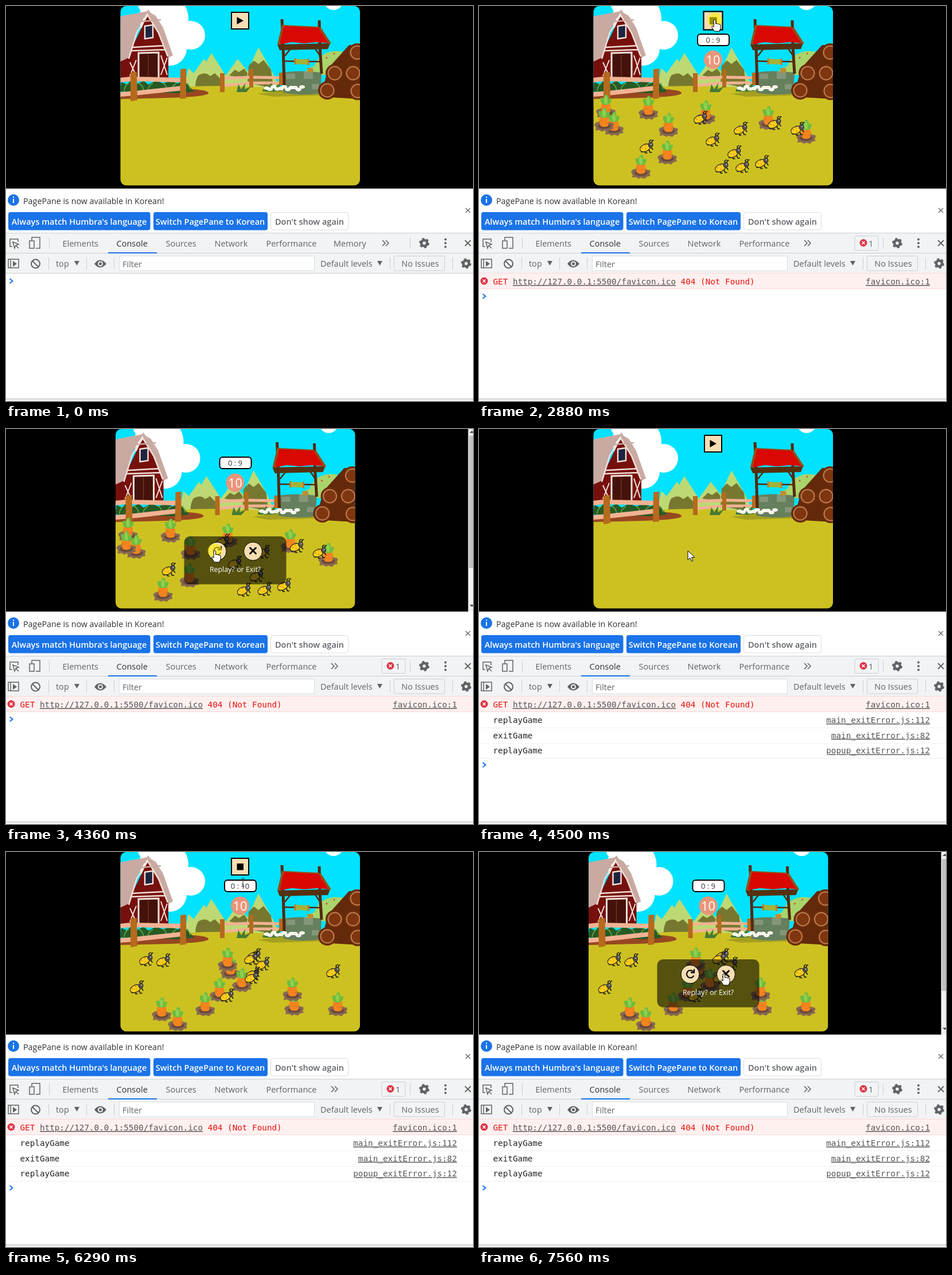
These frames come from a looping animation (814 by 688 pixels, 8 s). An HTML page:

```html
<!DOCTYPE html>
<html lang="en">
<head>
<meta charset="utf-8">
<title>Carrot game</title>
<style>
html, body { margin: 0; width: 100%; height: 100%; overflow: hidden; background: #fff; }
svg { display: block; }
text { font-family: "Open Sans", "Noto Sans", sans-serif; font-size: 14.5px; fill: #5f6368; white-space: pre; }
.mid { text-anchor: middle; }
.bold { font-weight: 600; }
.dark { fill: #303134; }
.white { fill: #fff; }
.mono text { font-family: "DejaVu Sans Mono", "Noto Sans Mono", monospace; font-size: 14.3px; fill: #222; }
.mono .red { fill: #e8120c; }
.mono .link { fill: #555; text-decoration: underline; }
.mono .end { text-anchor: end; }
.icon { fill: none; stroke: #5f6368; }
.sep { stroke: #cbcdd1; }
.ink { fill: none; stroke: #111; stroke-linecap: round; }
.trim { fill: none; stroke: #f2e0d8; }
</style>
</head>
<body>
<svg width="814" height="688" viewBox="0 0 814 688">
<defs>
  <clipPath id="field"><rect x="199.500" width="417.500" height="312.500" rx="10"/></clipPath>
  <g id="carrot">
    <path fill="#87684f" d="M-17 6q2-5 7-5l3-3h14l3 4 6 1q2 3-1 6l2 4-6 1-4 4-7-2-3 2-6-3-6 1 1-5z"/>
    <path fill="#684a3c" d="M-11 6h23q0 7-12 7t-11-7z"/>
    <path fill="#f5841f" d="M-8-7q8-3 16 0 1 8-1 15 -7 3-13 0-3-7-2-15z"/>
    <path d="M-7-1h4M3 3h4" stroke="#dd6a10"/>
    <path fill="#6bbd3e" d="M-4-6q-7-5-5-12 6-1 6 2 0-7 4-8 5 2 3 9 3-3 6-1 0 7-6 10z"/>
    <path fill="#8fd050" d="M-1-7q-5-9 1-15 5 7 2 15z"/>
  </g>
  <g id="bug">
    <path class="ink" stroke-width="1.500" d="M-8 6l-1 3 3 0M-3 7l1 4 3 0M4 5l2 5 3 0M8 1l3 4M6-7l-1-3 3-2M9-7l1-4 2 0"/>
    <ellipse cx="-3" cy="1" rx="9.500" ry="6.200" transform="rotate(-24)" fill="#f6cf1c" stroke="#332c1c" stroke-width="1.300"/>
    <g fill="#e9951a"><circle cx="-7" cy="2" r="1.200"/><circle cx="-2" cy="-2" r="1.200"/><circle cx="-1" cy="4" r="1.200"/></g>
    <ellipse cx="7" cy="-3" rx="4" ry="4.800" fill="#55504e" stroke="#2b2725"/>
    <circle cx="8" cy="-4" r="1" fill="#ddd"/>
  </g>
  <g id="gear">
    <circle r="5" fill="none" stroke="#5f6368" stroke-width="4.500"/>
    <circle r="7.700" fill="none" stroke="#5f6368" stroke-width="2.600" stroke-dasharray="4 4.060"/>
  </g>
  <g id="log">
    <circle r="16" fill="#6b2b0a"/><circle r="11.500" fill="#7f3610" stroke="#bd7f50" stroke-width="2"/>
  </g>
  <path id="cross" d="M-5-5L5 5M5-5L-5 5"/>
  <g id="fault"><circle r="6.500" fill="#dc3545"/><path d="M-2.500-2.500l5 5m0-5l-5 5" stroke="#fff" stroke-width="1.500"/></g>
</defs>

<rect width="814" height="318"/>
<g id="page">
  <g clip-path="url(#field)">
    <rect x="199" width="419" height="160" fill="#00e2ff"/>
    <g fill="#fff">
      <circle cx="275" cy="22" r="43"/><circle cx="322" cy="51" r="25"/><circle cx="285" cy="74" r="30"/>
      <circle cx="246" cy="-3" r="16"/><circle cx="571" cy="-10" r="17"/>
    </g>
    <!-- hills -->
    <path fill="#bdd974" d="M310 143l8-35 9 9 18-25 4 5 9-15 25 39 21-29 17 22 19-42 22 39 15 32z"/>
    <path fill="#777830" d="M330 143q0-14 5-22 8-5 15-3l6 4 8-5 12 12 4 14zM389 121l10-10 7 4 9-6 6 8-2 10zM421 134l2-30 9-9 8 6 9-7 13 17 4 32z"/>
    <path fill="#cdc122" d="M199 152q90-14 190-13l95 4 133-5V313H199z"/>
    <!-- barn -->
    <path fill="#76100d" d="M199 94l14-8 34-70 20 31 16 40v40h-84z"/>
    <path fill="#c9aaa2" d="M199 18l48-9-19 34-14 47-15 7z"/>
    <path fill="#c9aaa2" d="M247 9l14 8 13 21 17 48-8 4-17-44-19-30z"/>
    <path class="trim" stroke-width="2.500" d="M214 92l14-46 19-30 19 31 16 41M221 72l54-3M218 78l60-2"/>
    <path class="trim" stroke-width="2" d="M216 98l11 24M227 94l-11 28M270 86l11 34M281 90l-11 30"/>
    <path fill="#45120b" stroke="#f2e0d8" stroke-width="3" d="M231 82l35-1v47h-35z"/>
    <path d="M248 84v40" stroke="#7d4027"/>
    <path fill="#1c2440" stroke="#f2e0d8" stroke-width="2.500" d="M242 35l14-2v22l-14 2z"/>
    <path fill="none" stroke="#c9aaa2" stroke-width="2.500" d="M236 27l34-3M240 20l8-12 7 11"/>
    <!-- near fence -->
    <path fill="#974721" d="M199 151q60-9 128-6 27 2 26 7-3 6-70 8l-84 2z"/>
    <path fill="#275a24" d="M199 149l2-17 10 5 6-7 11 6 12-6 8 7 14-7 12 5 12-5 14 5 8-7 20 21-22 3z"/>
    <path fill="none" stroke="#68a84b" stroke-width="1.500" d="M206 148q1-10 8-14M240 148q-1-10-9-14M247 148q1-9 9-13M281 147q-1-10-8-13M288 147q2-9 9-12M321 145q-2-9-6-11"/>
    <path fill="none" stroke="#f2b293" stroke-width="8" d="M199 129l18-2 90 2 8-2M199 154l25-2 83-9"/>
    <path fill="#b56a1d" d="M217 116l11-1 1 49-12 2zM304 110l10-1v52l-11 1z"/>
    <!-- far fence -->
    <path fill="none" stroke="#f2b293" stroke-width="5" d="M376 126l52-2 52 1M376 139l50-5 56 0"/>
    <path fill="#b56a1d" d="M373 117h8v33h-8zM424 110h7v32h-7zM476 116h8v22h-8z"/>
    <path fill="#477a35" d="M402 150l3-14 5 9 7-11-1 11 11-5-8 10zM447 149l4-12 6 8 5-11 6 8 8-7 6 15z"/>
    <!-- bush, well -->
    <path fill="#a9d46b" d="M520 119q4-11 17-14 9-23 32-26 21-3 36 13v30z"/>
    <g fill="#d9482c"><circle cx="549" cy="100" r="1.500"/><circle cx="559" cy="90" r="1.500"/><circle cx="572" cy="83" r="1.500"/><circle cx="586" cy="88" r="1.500"/><circle cx="534" cy="112" r="1.500"/></g>
    <path fill="#a6a020" d="M438 153l48-6 66 1 13 7-100 3z"/>
    <path fill="#667f5d" d="M483 116q30-5 67 0l-2 36q-34 5-65-1z"/>
    <path fill="#84967a" d="M489 118h15v9h-15zM519 114h16v13h-16zM533 136h12v9h-12z"/>
    <path fill="none" stroke="#55290e" stroke-width="5" d="M481 23l2 47 2 68M546 25l1 45 3 48"/>
    <path fill="none" stroke="#55290e" stroke-width="2.500" d="M484 96l65 1M486 87l12-15M547 86l-9-13"/>
    <path fill="#56310f" d="M473 67l92-2-4 10-84 2z"/>
    <path fill="#d90800" d="M483 34l63 3 18 28-22-2-22 2-22-2-22 4z"/>
    <path fill="none" stroke="#925019" stroke-width="4" d="M483 33l-8 34M547 38l18 28"/>
    <path fill="none" stroke="#925019" stroke-width="2" d="M483 34l63 3"/>
    <path fill="#a5b235" d="M504 92l23 1v9l-23-1z"/><path stroke="#c47827" stroke-width="3" d="M504 91v11M527 92v11"/>
    <path fill="#bd8d31" d="M525 108h10l-1 8h-8z"/>
    <g id="daisies" fill="#fff"></g>
    <path fill="#63290b" d="M548 158l14-50 36-40h20v94z"/>
    <use href="#log" x="612" y="81"/><use href="#log" x="605" y="117"/><use href="#log" x="573" y="117"/>
    <use href="#log" x="613" y="148"/><use href="#log" x="560" y="147"/>
    <g id="items"></g>
  </g>
  <g id="button">
    <rect x="393" y="11" width="30" height="29" fill="#f5deb3" stroke="#000" stroke-width="2"/>
    <path id="play" d="M402.500 19v13l11.500-6.500z"/>
    <rect id="stop" x="402.500" y="20" width="11.500" height="11.500"/>
  </g>
  <g id="hud">
    <rect x="381" y="49" width="55" height="20" rx="5" fill="#fff" stroke="#000" stroke-width="2"/>
    <text id="timer" class="mid dark" x="408" y="64" style="font-size:13px"></text>
    <circle cx="408" cy="93.500" r="16" fill="#e9967a"/>
    <text class="mid white" x="408" y="101.500" style="font-size:21.500px">10</text>
  </g>
</g>

<g id="popup">
  <rect x="805.500" width="9" height="318" fill="#f1f1f1"/>
  <rect x="807" y="12" width="7" height="230" fill="#c1c1c1"/>
  <path d="M808 7l4-4 4 4zM808 306l4 4 4-4z" fill="#505050"/>
  <rect x="310.500" y="187" width="178" height="83.500" rx="10" opacity=".58"/>
  <g fill="#f5deb3" stroke="#000"><circle cx="368" cy="213" r="16"/><circle cx="430.500" cy="213" r="16"/></g>
  <path class="ink" stroke-width="2.300" d="M373 208a6.500 6.500 0 1 0 1 8M375 205v5h-5"/>
  <use href="#cross" x="430.500" y="212" class="ink" stroke-width="3"/>
  <text class="mid white" x="399.500" y="249" style="font-size:12.400px">Replay? or Exit?</text>
</g>

<!-- developer panel -->
<rect y="318" width="814" height="370" fill="#fff"/>
<circle cx="13" cy="338" r="10" fill="#1a73e8"/>
<path d="M13 336v7M13 332v2" stroke="#fff" stroke-width="2"/>
<text class="dark" x="30" y="344.500" style="font-size:14.300px">PagePane is now available in Korean!</text>
<rect x="4" y="359" width="247.500" height="31.500" rx="4" fill="#1a73e8"/>
<rect x="257" y="359" width="199" height="31.500" rx="4" fill="#1a73e8"/>
<rect x="461.500" y="359.500" width="135" height="30.500" rx="4" fill="#fff" stroke="#dadce0"/>
<text class="mid bold white" x="127.500" y="381">Always match Humbra's language</text>
<text class="mid bold white" x="356" y="381">Switch PagePane to Korean</text>
<text class="mid bold" x="529" y="381">Don't show again</text>
<use href="#cross" x="805" y="356" class="icon" stroke-width="1.600" transform="translate(161 71.200) scale(.8)"/>
<rect y="395" width="814" height="70" fill="#f1f3f4"/>
<path class="sep" d="M0 395.500h814M0 430.500h814M0 465.500h814M75.500 403v20M704.500 403v20M74.500 438v21M140.500 438v21M188.500 438v21M669.500 438v21M778.500 438v21"/>
<g class="icon" stroke-width="1.500">
  <path d="M11 419H7V406h14v5M12 411l10 4-5 2-2 5z M17 417l5 5"/>
  <path d="M45 408v-5h14v19h-7M41 409h8v13h-8z"/>
  <path d="M4 441h18v15H4zM8 441v15"/>
  <circle cx="51.500" cy="449" r="7.500" stroke-width="2"/><path d="M46 444l11 11" stroke-width="2"/>
</g>
<path d="M12 444v10l7-5z" fill="#5f6368"/>
<text x="98.500" y="419">Elements</text>
<text class="dark" x="192.500" y="419">Console</text>
<text x="278.500" y="419">Sources</text>
<text x="363.500" y="419">Network</text>
<text x="453.500" y="419">Performance</text>
<text id="memory" x="571" y="419">Memory</text>
<path d="M178 430h85" stroke="#1a73e8" stroke-width="2"/>
<path id="more" class="icon" stroke-width="1.500" d="M-5-5l5 5-5 5M1-5l5 5-5 5"/>
<g id="badge">
  <rect x="655" y="400.500" width="41" height="25" rx="2" fill="#f1f3f4" stroke="#cbcdd1"/>
  <use href="#fault" x="670" y="412.500"/><text x="679" y="419">1</text>
</g>
<use href="#gear" x="729" y="413"/><use href="#gear" x="802" y="448.500"/>
<g fill="#5f6368"><circle cx="766" cy="406.500" r="2"/><circle cx="766" cy="413" r="2"/><circle cx="766" cy="419.500" r="2"/></g>
<use href="#cross" x="805" y="413" class="icon" stroke-width="1.800"/>
<text x="87" y="454">top</text>
<path d="M119 444h9l-4.500 8zM647 444h9l-4.500 8z" fill="#5f6368"/>
<path d="M154 449q10-13 21 0-11 13-21 0z" fill="#5f6368"/>
<circle cx="164.500" cy="449" r="3.500" fill="#5f6368" stroke="#f1f3f4" stroke-width="2"/>
<rect x="197.500" y="435.500" width="340" height="25.500" fill="#fff" stroke="#dadce0"/>
<text x="203" y="455">Filter</text>
<text x="548" y="454">Default levels</text>
<rect x="676.500" y="435.500" width="88" height="25.500" rx="2" fill="none" stroke="#cbcdd1"/>
<text class="mid" x="722" y="454">No Issues</text>
<g id="error" class="mono">
  <rect y="466" width="814" height="26.500" fill="#fff0f0"/>
  <path d="M0 465.500h814M0 492.500h814" stroke="#ffd6d6"/>
  <use href="#fault" x="9" y="479"/>
  <text class="red" x="24.500" y="485">GET <tspan class="link">http://127.0.0.1:5500/favicon.ico</tspan> 404 (Not Found)</text>
  <text class="link end" x="786" y="485">favicon.ico:1</text>
</g>
<g id="logs" class="mono"></g>
<path id="prompt" d="M-2.500-4l5 4-5 4" fill="none" stroke="#1a73e8" stroke-width="2"/>
<path d="M0 684.500h814" stroke="#cbcdd1" stroke-width="2"/>
<rect y="686" width="814" height="2" fill="#f8f9fa"/>

<g id="pointer">
  <circle id="press" r="12.500" fill="#ffef00" opacity=".6"/>
  <path id="arrow" d="M0 0v16l4-3.500 2.500 6 2.500-1-2.500-6H12z" fill="#fff" stroke="#000"/>
  <path id="hand" d="M-1.800 1.500a1.700 1.700 0 0 1 3.400 0V7q1.600-1.500 3 .3 1.500-1 2.800.6 2.400-.6 2.600 1.600V14q0 3-1.500 4v2H-.800L-4.800 13.500q-1.200-2.600.6-3l2.400 2z" fill="#fff" stroke="#000"/>
  <path id="beam" d="M-3-7h2.500M.500-7H3M0-7V7M-3 7h2.500M.500 7H3" stroke="#333" fill="none"/>
</g>
</svg>

<script>
const $ = id => document.getElementById(id);
const show = (id, on) => $(id).style.display = on ? '' : 'none';
const move = (id, x, y) => $(id).setAttribute('transform', `translate(${x} ${y})`);
const within = (t, a, b) => t >= a && t < b;

const rounds = [
  { carrots: [[221,178],[235,208],[218,201],[295,180],[330,210],[328,258],[282,283],[395,188],[504,198],[570,222]],
    bugs: [[386,195],[456,214],[515,204],[555,214],[407,233],[292,245],[445,255],[423,280],[459,279],[493,272]] },
  { carrots: [[391,204],[386,190],[411,226],[372,243],[347,268],[271,277],[299,294],[502,267],[499,242],[578,268]],
    bugs: [[244,187],[274,189],[432,180],[427,185],[447,195],[430,212],[428,218],[385,250],[570,208],[228,236]] }
];
const place = (name, spots) => spots.map(([x, y]) => `<use href="#${name}" x="${x}" y="${y}"/>`).join('');
$('items').innerHTML = rounds.map((r, i) => `<g id="round${i}">${place('carrot', r.carrots)}${place('bug', r.bugs)}</g>`).join('');

$('daisies').innerHTML = Array.from({ length: 11 }, (_, i) => {
  const x = 454 + i * 6.2, y = 143 + 2.5 * Math.sin(i * 2.3);
  return `<ellipse cx="${x}" cy="${y}" rx="5" ry="3"/><circle cx="${x}" cy="${y}" r=".8" fill="#e9c92c"/>`;
}).join('');

$('logs').innerHTML = [['replayGame', 'main_exitError.js:112'], ['exitGame', 'main_exitError.js:82'], ['replayGame', 'popup_exitError.js:12']]
  .map(([msg, link], i) => {
    const y = 512 + i * 26.7;
    return `<text x="24.500" y="${y}">${msg}</text><text class="link end" x="786" y="${y}">${link}</text>` +
      `<path d="M0 ${Math.round(y + 8) + .5}h814" stroke="#f0f0f0"/>`;
  }).join('');

// Pointer legs: start, end, steps, destination
const legs = [
  [130, 270, 3, 480, 30], [600, 1210, 10, 411, 24], [3230, 3560, 6, 364, 212],
  [4700, 5290, 9, 420, 31], [5360, 5490, 3, 411, 24], [5960, 6290, 6, 413, 53],
  [6360, 6630, 5, 411, 24], [6840, 7560, 11, 427, 212]
];
const presses = [[1280, 1410], [2880, 3030], [4360, 4430], [5490, 5630], [6700, 6770]];

function pointerAt(t) {
  let x = 873, y = 982;
  legs.forEach(([start, end, steps, toX, toY], i) => {
    if (t < start) return;
    const p = Math.min(1, (Math.floor((t - start) / (end - start) * (steps - 1) + .001) + 1) / steps);
    const k = i ? p * p * (3 - 2 * p) : p;
    x += (toX - x) * k;
    y += (toY - y) * k;
  });
  return [x, y];
}

function draw(t) {
  const first = within(t, 1410, 4430), second = t >= 5630;
  const popup = within(t, 3030, 4430) || t >= 6770;
  const playing = first || second;
  const [x, y] = pointerAt(t);
  const onButton = !popup && within(x, 392, 425) && within(y, 10, 42);
  const onTimer = playing && !popup && within(x, 380, 437) && within(y, 48, 70);
  const onChoice = popup && [368, 430.5].some(cx => Math.hypot(x - cx, y - 213) < 16);
  const failed = t >= 1480, logged = t >= 4500;

  move('page', popup ? -8.5 : 0, 0);
  show('round0', first);
  show('round1', second);
  show('hud', playing);
  show('popup', popup);
  show('button', !popup);
  show('play', !playing);
  show('stop', playing);
  $('button').setAttribute('transform', onButton ? 'translate(408 25.500) scale(1.1) translate(-408 -25.500)' : '');
  $('timer').textContent = within(t, 2410, 4430) || t >= 6630 ? '0 : 9' : '0 : 10';

  show('memory', !failed);
  show('badge', failed);
  show('error', failed);
  show('logs', logged);
  move('more', failed ? 572 : 661, 413);
  move('prompt', 9, logged ? 585 : failed ? 505.5 : 479);

  show('pointer', t >= 130);
  move('pointer', x, y);
  show('press', presses.some(([a, b]) => within(t, a, b)));
  show('hand', onButton || onChoice);
  show('beam', onTimer);
  show('arrow', !onButton && !onChoice && !onTimer);
}

const origin = performance.now();
function tick() {
  draw((performance.now() - origin) % 8000);
  requestAnimationFrame(tick);
}
tick();
</script>
</body>
</html>
```
